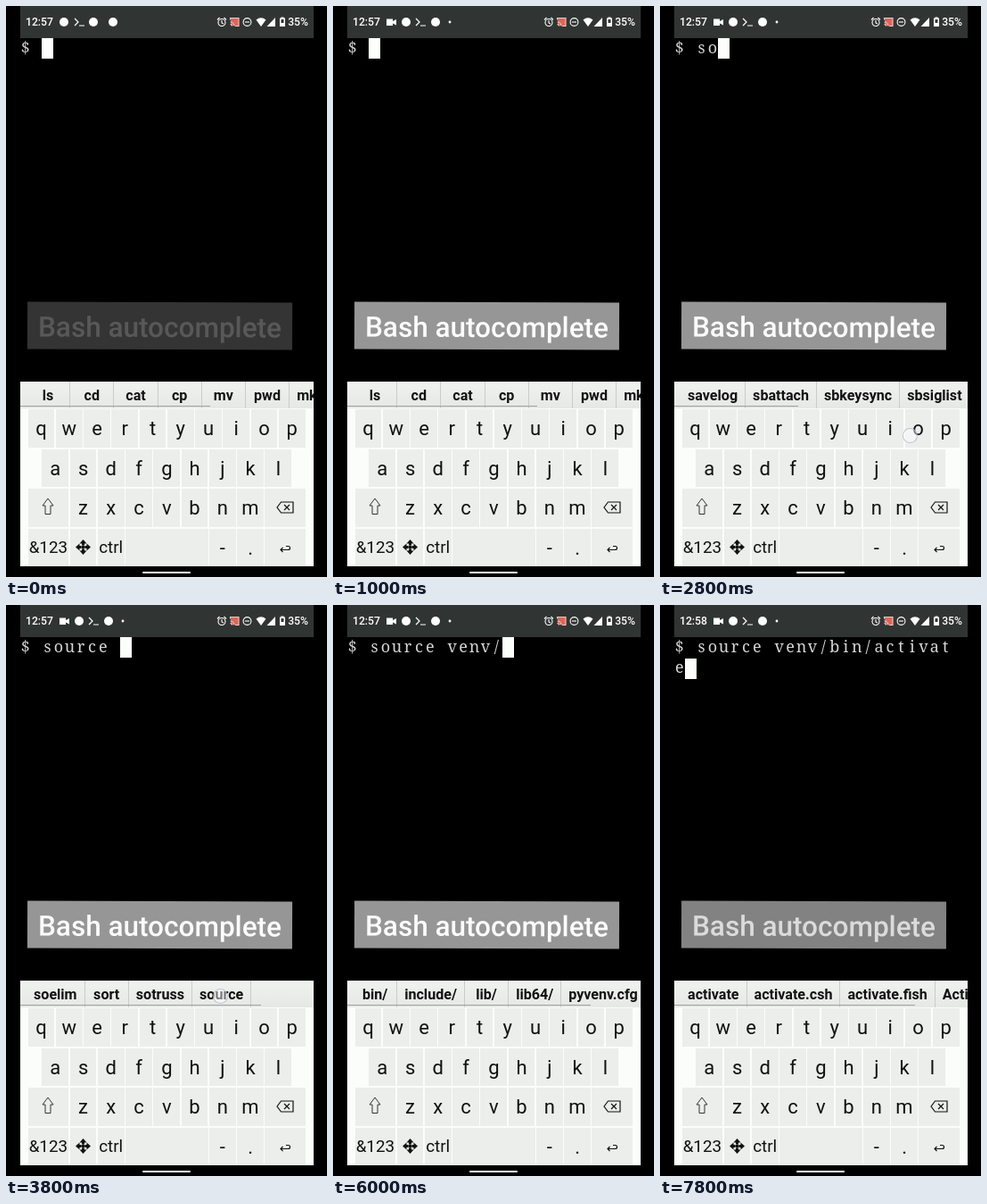
Animation, 360 px wide and 640 px high, one loop 8000 ms. Source, as an HTML page:

```html
<!DOCTYPE html>
<html lang="en">
<head>
<meta charset="utf-8">
<title>Bash autocomplete</title>
<style>
html, body { margin: 0; width: 100%; height: 100%; overflow: hidden; background: #000; }
#stage { position: relative; width: 360px; height: 640px; overflow: hidden; background: #000; font-family: Roboto, sans-serif; }
#stage div, #stage svg { position: absolute; }
#status { left: 15.5px; top: 0; width: 329px; height: 36px; background: #303534; }
.info { top: 10px; height: 16px; line-height: 16px; font-size: 12.2px; font-weight: 500; color: #fff; }
#term { left: 15.5px; top: 34.5px; font: 300 18px/23.2px "Noto Serif", serif; color: #d4d6d4; }
#term span { display: inline-block; width: 12.45px; height: 23.2px; text-align: center; white-space: pre; vertical-align: top; }
#cursor { width: 13px; height: 23px; background: #fcfffc; }
#caption { left: 24px; top: 332px; width: 297px; height: 53px; background: #969696; color: #fcfcfc;
  font-size: 31.5px; font-weight: 500; line-height: 57.5px; text-align: center; white-space: nowrap; transform: rotate(.2deg); }
#panel { left: 15.5px; top: 421px; width: 329px; height: 207px; background: #fbfdfb; }
#bar { left: 15.5px; top: 421px; width: 329px; height: 30px; overflow: hidden; background: linear-gradient(#f0f2f0, #e6e8e6); }
#list { left: 7.5px; top: 0; display: flex; }
#list span { flex: none; box-sizing: border-box; min-width: 49.2px; padding: 0 8px; text-align: center; white-space: nowrap;
  font-size: 16.1px; font-weight: 700; line-height: 31px; color: #111; border-right: 1px solid #c9ccc9; }
#thumb { left: 0; top: 27px; height: 1px; background: #9da09d; }
#keys, #icons { left: .4px; top: 0; }
.key { background: #ebeeeb; color: #111; font-size: 22px; text-align: center; height: 42.5px; line-height: 43px; }
.key.small { font-size: 18.8px; }
.key.down { background: #c4c8c5; color: #666; }
#touch { width: 15px; height: 15px; margin: -8.5px; border: 1px solid rgba(165,165,200,.65); border-radius: 50%; background: rgba(255,255,255,.45); }
#pill { left: 153px; top: 634px; width: 54px; height: 2px; border-radius: 1px; background: #fff; }
</style>
</head>
<body>
<div id="stage">
  <div id="status"></div>
  <div class="info" id="clock" style="left:22px"></div>
  <div class="info" style="right:21px">35%</div>
  <svg width="360" height="36" fill="#fff">
    <g id="before">
      <circle cx="65" cy="18" r="5"/><circle cx="98" cy="18" r="5"/><circle cx="120" cy="18" r="5"/>
      <path d="M77 14l4 4-4 4M82 22h6" fill="none" stroke="#fff" stroke-width="1.2"/>
    </g>
    <g id="after">
      <path d="M60 14.5h7v2.5l4-2v6.5l-4-2v2.5h-7z"/>
      <circle cx="82" cy="18" r="5"/><circle cx="115" cy="18" r="5"/><circle cx="131" cy="18" r="1.4"/>
      <path d="M93 14l4 4-4 4M98 22h6" fill="none" stroke="#fff" stroke-width="1.2"/>
    </g>
    <path d="M252 14h9v8h-9z" fill="#d9685c"/>
    <g fill="none" stroke="#fff" stroke-width="1.1">
      <circle cx="242" cy="18.5" r="4"/><path d="M242 16v3l2 1M237 15.5l2.5-2.5M247 15.5l-2.5-2.5"/>
      <path d="M251.5 15.5v-2h9.5v9h-4M251.5 18a4.5 4.5 0 0 1 4.5 4.5M251.5 20.5a2 2 0 0 1 2 2" stroke="#f1c8c2"/>
      <circle cx="270.5" cy="18" r="4.4"/><path d="M268 18h5"/>
    </g>
    <path d="M280.5 15.5q5.5-4.5 11 0l-5.5 7.5zM302 13v10h-9.5z"/>
    <path d="M308.5 12.5h3v1h1.5v9.5h-6v-9.5h1.5z"/>
    <path d="M308.5 15h3v4h-3z" fill="#303534"/>
  </svg>

  <div id="term"></div>
  <div id="cursor"></div>
  <div id="caption">Bash autocomplete</div>

  <div id="panel"></div>
  <div id="bar"><div id="list"></div><div id="thumb"></div></div>
  <div id="keys"></div>
  <svg id="icons" width="360" height="640" fill="none" stroke="#111" stroke-width="1.2">
    <path d="M47 552l6 8h-3v9.5h-6v-9.5h-3z" stroke="#333" stroke-width="1"/>
    <path d="M304 562l4.5-6h13.5v12h-13.5zM312 559l6 6M318 559l-6 6"/>
    <path d="M314 605.5h2.5a2 2 0 0 1 0 4h-8.5M310.5 607l-2.5 2.5 2.5 2.5"/>
    <g id="move" fill="#111" stroke="none"><circle cx="86.5" cy="606.5" r="2"/></g>
  </svg>
  <div id="touch"></div>
  <div id="pill"></div>
</div>
<script>
const $ = id => document.getElementById(id);
const LOOP = 8000, STEP = 200, COLS = 25, CHAR = 12.45, LINE = 23.2, PITCH = 31.25;

// scrollbar width, words
const menus = {
  home: [213, 'ls cd cat cp mv pwd mkdir'],
  s: [139, 'savelog sbattach sbkeysync sbsiglist'],
  so: [270, 'soelim sort sotruss source'],
  files: [96, '__pycache__/ ACKNOWLEDGEMENT.md CHANGELOG.md'],
  v: [330, 'venv/'],
  venv: [273, 'bin/ include/ lib/ lib64/ pyvenv.cfg'],
  bin: [116, '__pycache__/ activate activate.csh activate.fish'],
  act: [270, 'activate activate.csh activate.fish Activate.ps1']
};

// time, typed text, suggestions
const states = [
  [0, '', 'home'], [2400, 's', 'home'], [2600, 's', 's'], [2800, 'so', 's'], [3000, 'so', 'so'],
  [3800, 'source ', 'so'], [4000, 'source ', 'files'],
  [4800, 'source v', 'files'], [5000, 'source v', 'v'],
  [5600, 'source venv/', 'v'], [6000, 'source venv/', 'venv'],
  [6400, 'source venv/bin/', 'venv'], [6600, 'source venv/bin/', 'bin'],
  [7400, 'source venv/bin/activate', 'bin'], [7600, 'source venv/bin/activate', 'act']
];

// start, end, x, y, pressed key
const touches = [
  [2200, 2600, 88, 515, 's'], [2600, 3000, 280, 481, 'o'], [3600, 4000, 240, 438],
  [4600, 4800, 181, 567, 'v'], [5400, 5800, 55, 438], [6200, 6600, 47, 438], [7200, 7600, 178, 440]
];

const keys = {};
function addKey(label, x, y, w = PITCH) {
  const k = document.createElement('div');
  k.className = label.length > 1 ? 'key small' : 'key';
  k.textContent = label;
  k.style.cssText = `left:${x + .6}px;top:${y}px;width:${w - 1.4}px`;
  $('keys').append(k);
  keys[label] = k;
}
const addRow = (chars, x, y) => [...chars].forEach((c, i) => addKey(c, x + i * PITCH, y));

addRow('qwertyuiop', 23.6, 452);
addRow('asdfghjkl', 39.4, 496.5);
addRow('zxcvbnm', 70.6, 541);
addKey('', 23.6, 541, 47);
addKey('', 289.4, 541, 47);
addKey('&123', 23.6, 585.5, 47);
addKey('', 70.6, 585.5);
addKey('ctrl', 101.8, 585.5);
addKey('', 133, 585.5, 94);
addRow('-.', 226.9, 585.5);
addKey('', 289.4, 585.5, 47);

for (let a = 0; a < 360; a += 90) {
  const p = document.createElementNS('http://www.w3.org/2000/svg', 'path');
  p.setAttribute('d', 'M86.5 598l4 4.5h-2.5v2h-3v-2h-2.5z');
  p.setAttribute('transform', `rotate(${a} 86.5 606.5)`);
  $('move').append(p);
}

function span(text) {
  const s = document.createElement('span');
  s.textContent = text;
  return s;
}

let menu;
function showMenu(name) {
  if (name === menu) return;
  menu = name;
  const [thumb, words] = menus[name];
  $('list').replaceChildren(...words.split(' ').map(span));
  $('thumb').style.width = thumb + 'px';
}

function showLine(text) {
  $('term').style.width = COLS * CHAR + 1 + 'px';
  $('term').replaceChildren(...[...text].map(span));
  $('cursor').style.left = Math.round(15.5 + text.length % COLS * CHAR) + 'px';
  $('cursor').style.top = Math.round(36.4 + Math.floor(text.length / COLS) * LINE) + 'px';
}

function draw(t) {
  const [, typed, name] = states.findLast(s => s[0] <= t);
  showLine('$ ' + typed);
  showMenu(name);

  $('clock').textContent = t < 6800 ? '12:57' : '12:58';
  $('before').style.display = t < STEP ? '' : 'none';
  $('after').style.display = t < STEP ? 'none' : '';
  $('caption').style.opacity = t < 7800 ? Math.min(1, .35 + .65 * t / 600) : .87;

  const hit = touches.find(([a, b]) => t >= a && t < b);
  for (const k in keys) keys[k].classList.toggle('down', !!hit && hit[4] === k && t < hit[0] + STEP);
  $('touch').style.display = hit ? '' : 'none';
  if (hit) {
    $('touch').style.left = hit[2] + 'px';
    $('touch').style.top = hit[3] + 'px';
  }
}

let last = -1;
const start = performance.now();
function tick(now) {
  const t = Math.floor(Math.max(0, now - start) % LOOP / STEP) * STEP;
  if (t !== last) draw(last = t);
  requestAnimationFrame(tick);
}
draw(0);
requestAnimationFrame(tick);
</script>
</body>
</html>
```
